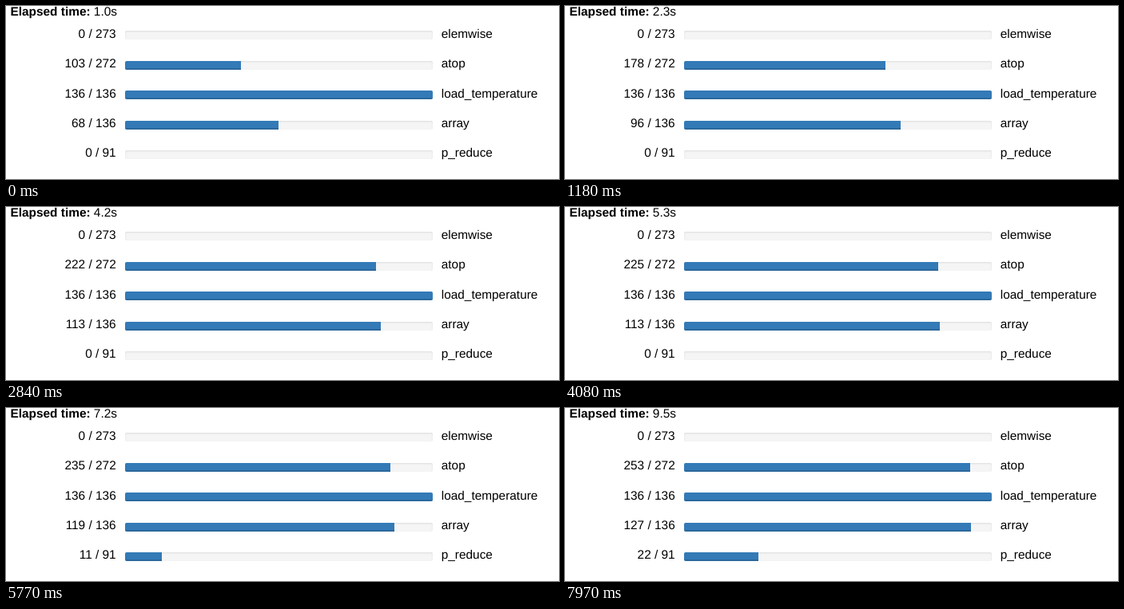
Write an HTML page that moves like this. It is 692 by 217 pixels and loops after 8 s.

```html
<!DOCTYPE html>
<html lang="en">
<head>
<meta charset="utf-8">
<title>Task progress</title>
<style>
  html, body { margin: 0; width: 100%; height: 100%; overflow: hidden; background: #fff; }
  body {
    position: relative; color: #000;
    font: 15.4px/17px "Liberation Sans", Arial, sans-serif;
    text-rendering: geometricPrecision;
  }
  .text { position: absolute; white-space: pre; }
  .clock { left: 5.5px; top: -1px; }
  .count { left: 0; width: 137.7px; text-align: right; }
  .name { left: 544.75px; }
  .track {
    position: absolute; left: 149px; width: 385px; height: 11px;
    overflow: hidden; border-radius: 2px; background: #f5f5f5;
    box-shadow: inset 0 1.1px 2.2px rgba(0, 0, 0, .1);
  }
  .fill { height: 100%; background: #337ab7; box-shadow: inset 0 -2px 0 rgba(0, 0, 0, .15); }
</style>
</head>
<body>
<div class="text clock"><b>Elapsed time:</b> <span id="clock"></span></div>
<script>
const LOOP = 8000;
const TRACK_LEFT = 148.7, TRACK_WIDTH = 385;
const CLOCK_RATE = 1.12 / 1000;

// Moments when the clock stands still: start and length in ms
const stalls = [[3220, 250], [7600, 100]];

// Finished tasks over time, as a few [ms, count] points
const tasks = [
  { name: "elemwise", total: 273, path: [[0, 0]] },
  { name: "atop", total: 272, path: [
    [0, 103], [640, 158], [1740, 199], [2840, 222], [3200, 225], [4370, 225],
    [5070, 226], [6510, 244], [7540, 253]] },
  { name: "load_temperature", total: 136, path: [[0, 136]] },
  { name: "array", total: 136, path: [
    [0, 68], [640, 89], [1660, 102], [1740, 109], [2840, 113], [4370, 113],
    [5070, 114], [6510, 124], [6800, 127]] },
  { name: "p_reduce", total: 91, path: [[4370, 0], [5070, 6], [6510, 17], [7970, 22]] }
];

const clamp = (v, lo, hi) => Math.min(hi, Math.max(lo, v));

function along(path, t) {
  const next = path.findIndex(([time]) => time > t);
  if (next === 0) return path[0][1];
  if (next < 0) return path[path.length - 1][1];
  const [t0, v0] = path[next - 1], [t1, v1] = path[next];
  return v0 + (v1 - v0) * (t - t0) / (t1 - t0);
}

function elapsed(t) {
  const stalled = stalls.reduce((sum, [from, length]) => sum + clamp(t - from, 0, length), 0);
  return 1 + (t - stalled) * CLOCK_RATE;
}

function add(parent, className, top, text = "") {
  const el = document.createElement("div");
  el.className = className;
  if (top !== undefined) el.style.top = top + "px";
  el.textContent = text;
  return parent.appendChild(el);
}

tasks.forEach((task, i) => {
  const textTop = Math.round(27 + 37.35 * i);
  task.count = add(document.body, "text count", textTop);
  task.fill = add(add(document.body, "track", Math.round(31.4 + 37.4 * i)), "fill");
  add(document.body, "text name", textTop, task.name);
});
const clock = document.getElementById("clock");

function show(t) {
  clock.textContent = elapsed(t).toFixed(1) + "s";
  for (const { total, path, count, fill } of tasks) {
    const done = Math.round(along(path, t));
    count.textContent = `${done} / ${total}`;
    fill.style.width = Math.round(TRACK_LEFT + TRACK_WIDTH * done / total) - 149 + "px";
  }
}

const start = performance.now();

function tick() {
  show((performance.now() - start) % LOOP);
  requestAnimationFrame(tick);
}

tick();
</script>
</body>
</html>
```
